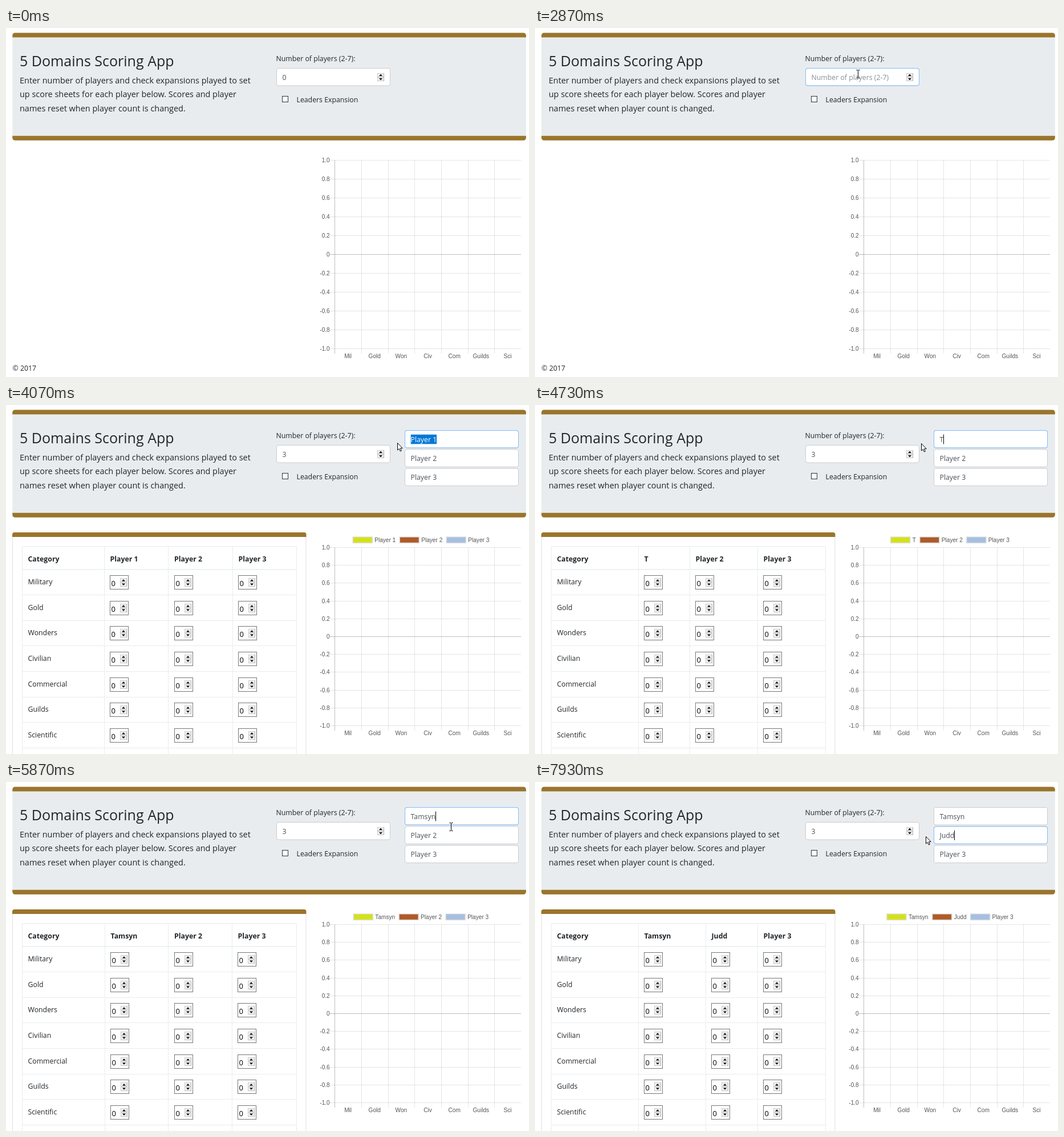
Animation of 917 by 611 pixels, one loop 8000 ms. Source, as an HTML page with a canvas:

```html
<!DOCTYPE html>
<html lang="en">
<head>
<meta charset="utf-8">
<title>Scoring App</title>
<style>
  html, body { margin: 0; width: 100%; height: 100%; overflow: hidden; background: #fff; }
  canvas { display: block; }
</style>
</head>
<body>
<canvas id="stage" width="917" height="611"></canvas>
<script>
const ctx = document.getElementById('stage').getContext('2d');
const LOOP = 8000, TICKS_PER_SECOND = 15;
const SANS = '"Open Sans", "Noto Sans", sans-serif';
const ARIAL = '"Liberation Sans", Arial, sans-serif';
const BODY = `12.3px ${SANS}`, BOLD = `bold 12.3px ${SANS}`, CHART = `10.1px ${ARIAL}`;
const INK = '#212529', GOLD = '#9a752b', GRID = '#e9ecef', FIELD_INK = '#495057', CHART_INK = '#555';

const CATEGORIES = ['Military', 'Gold', 'Wonders', 'Civilian', 'Commercial', 'Guilds', 'Scientific'];
const CHART_LABELS = ['Mil', 'Gold', 'Won', 'Civ', 'Com', 'Guilds', 'Sci'];
const COLORS = ['#d4e219', '#b05a28', '#a5bfe2'];

const NUMBER_FIELD = { x: 474, y: 70 };
const NAME_FIELDS = [0, 1, 2].map(i => ({ x: 699, y: 44 + i * 33.3 }));
const FIELD_W = 200, FIELD_H = 31.5;

// All times below are in ticks.
const CLEAR = 38, READY = 48;
const FOCUS = [[27, 57], [57, 90], [90, Infinity]];
const NAMES = [
  { text: 'Tamsyn', keys: [70, 73, 76, 81, 83, 85] },
  { text: 'Judd', keys: [103, 106, 108, 119] }
];
const CARET_OFF = [[35, 38], [43, 48], [115, 119]];
const MOUSE = [
  [16, 528, 12], [24, 566, 80], [50, 566, 80], [56, 770, 62], [57, 768, 62], [62, 677, 67],
  [82, 677, 67], [88, 780, 78], [89, 782, 86], [93, 685, 87], [95, 685, 87], [96, 685, 95]
];
// Column edges for each length of the first name.
const COLUMNS = [
  [172, 284.5, 397], [181, 271, 390], [181, 271, 390], [179, 274, 391],
  [176, 279, 393], [174, 282, 395], [173, 284.5, 396]
];
const COLUMNS_SECOND = [181, 299, 390];

const clamp = v => Math.max(0, Math.min(1, v));

function text(str, x, y, font = BODY, color = INK, align = 'left') {
  ctx.font = font;
  ctx.fillStyle = color;
  ctx.textAlign = align;
  ctx.fillText(str, x, y);
}

function widthOf(str, font = BODY) {
  ctx.font = font;
  return ctx.measureText(str).width;
}

function rect(x, y, w, h, color) {
  ctx.fillStyle = color;
  ctx.fillRect(x, y, w, h);
}

function line(x1, y1, x2, y2, color, width = 1) {
  ctx.strokeStyle = color;
  ctx.lineWidth = width;
  ctx.beginPath();
  ctx.moveTo(x1, y1);
  ctx.lineTo(x2, y2);
  ctx.stroke();
}

function polygon(points, fill, stroke) {
  ctx.beginPath();
  points.forEach(([x, y]) => ctx.lineTo(x, y));
  ctx.closePath();
  ctx.fillStyle = fill;
  ctx.fill();
  if (stroke) {
    ctx.strokeStyle = stroke;
    ctx.lineWidth = 1;
    ctx.stroke();
  }
}

function spinner(x, y, h) {
  const mid = x + 6, half = h / 2;
  for (const top of [y, y + half]) {
    rect(x, top, 12, half, '#b0b0b0');
    rect(x + 0.5, top + 0.5, 10.5, half - 1.2, '#f0f0f0');
  }
  polygon([[mid - 3, y + half - 2], [mid + 3, y + half - 2], [mid, y + half - 5.2]], '#000');
  polygon([[mid - 3, y + half + 2], [mid + 3, y + half + 2], [mid, y + half + 5.2]], '#000');
}

function mouseAt(tick) {
  if (tick < MOUSE[0][0]) return null;
  const next = MOUSE.findIndex(key => key[0] > tick);
  if (next < 0) return MOUSE.at(-1).slice(1);
  const [t0, x0, y0] = MOUSE[next - 1], [t1, x1, y1] = MOUSE[next];
  const u = (tick - t0) / (t1 - t0), ease = u * u * (3 - 2 * u);
  return [Math.round(x0 + (x1 - x0) * ease), Math.round(y0 + (y1 - y0) * ease)];
}

function field(box, value, focus, tick, selectFrom) {
  const { x, y } = box, textX = x + 10.5, baseline = y + 20.5;
  const [start, end] = focus;
  ctx.beginPath();
  ctx.roundRect(x + 0.5, y + 0.5, FIELD_W - 1, FIELD_H - 1, 3.3);
  ctx.fillStyle = '#fff';
  ctx.fill();
  ctx.lineWidth = 1;
  ctx.strokeStyle = '#c9ccd0';
  ctx.stroke();
  ctx.globalAlpha = clamp((tick - start) / 2) * clamp(1 - (tick - end) / 2);
  ctx.strokeStyle = '#80bdff';
  ctx.stroke();
  ctx.globalAlpha = 1;

  text(value, textX, baseline, BODY, FIELD_INK);
  if (tick < start || tick >= end) return;
  const right = textX + widthOf(value);
  const left = Math.max(textX, selectFrom);
  if (left < right) {
    ctx.save();
    ctx.beginPath();
    ctx.rect(left, y + 7.5, right - left, 17);
    ctx.clip();
    rect(left, y + 7.5, right - left, 17, '#0078d7');
    text(value, textX, baseline, BODY, '#fff');
    ctx.restore();
  } else if (!CARET_OFF.some(([off, on]) => tick >= off && tick < on)) {
    rect(Math.round(right), y + 7.5, 1, 17, '#000');
  }
}

function header() {
  const x = 11.3, y = 8.4, w = 900.5, h = 188.4, bar = 8;
  ctx.save();
  ctx.beginPath();
  ctx.roundRect(x, y, w, h, 4.5);
  ctx.clip();
  rect(x - 1, y - 1, w + 2, h + 2, GRID);
  rect(x - 1, y - 1, w + 2, bar + 1, GOLD);
  rect(x - 1, y + h - bar, w + 2, bar + 1, GOLD);
  ctx.restore();

  text('5 Domains Scoring App', 24, 67, `25px ${SANS}`);
  ['Enter number of players and check expansions played to set',
   'up score sheets for each player below. Scores and player',
   'names reset when player count is changed.'
  ].forEach((row, i) => text(row, 24, 96.5 + i * 24.5, `14.45px ${SANS}`));

  text('Number of players (2-7):', 473.5, 57.5);
  rect(484, 119, 11, 11, '#333');
  rect(485, 120, 9, 9, '#fff');
  text('Leaders Expansion', 509.5, 129.5);
}

function scoreTable(names, columns) {
  const LEFT = 28.5, RIGHT = 509.5, TOP = 247.5, ROW = 44.65;
  line(11.5, 231, 11.5, 611, '#dfdfdf');
  line(526, 231, 526, 611, '#dfdfdf');
  ctx.beginPath();
  ctx.roundRect(11, 223, 515.5, 8, [4, 4, 0, 0]);
  ctx.fillStyle = GOLD;
  ctx.fill();

  line(LEFT, TOP, RIGHT, TOP, GRID);
  line(LEFT, 288, RIGHT, 288, GRID, 1.7);
  for (const x of [LEFT, ...columns, RIGHT]) line(Math.floor(x) + 0.5, TOP, Math.floor(x) + 0.5, 611, GRID);
  text('Category', 38.5, 273.5, BOLD);
  names.forEach((name, i) => text(name, columns[i] + 10.5, 273.5, BOLD));

  CATEGORIES.forEach((category, i) => {
    const y = Math.round(298 + i * ROW);
    text(category, 38.5, y + 16);
    const bottom = Math.floor(332.5 + i * ROW) + 0.5;
    line(LEFT, bottom, RIGHT, bottom, GRID);
    for (const column of columns) {
      const x = Math.round(column + 10);
      rect(x, y, 33, 25, '#777');
      rect(x + 1, y + 1, 31, 23, '#fff');
      text('0', x + 2.5, y + 18.5, `13px ${SANS}`, '#000');
      spinner(x + 18, y + 5, 15);
    }
  });
}

function chart(top) {
  const LEFT = 576.8, RIGHT = 903, BOTTOM = 561.5, STEP = 46.64;
  const faint = 'rgba(0,0,0,.1)', strong = 'rgba(0,0,0,.25)';
  for (let i = 0; i <= 10; i++) {
    const y = Math.floor(top + (BOTTOM - top) * i / 10) + 0.5;
    const value = (5 - i) / 5;
    line(568, y, RIGHT, y, i === 5 ? strong : faint);
    text(value ? value.toFixed(1) : '0', 567.7, y + 3, CHART, CHART_INK, 'right');
  }
  CHART_LABELS.forEach((label, i) => {
    const x = Math.floor(LEFT + i * STEP) + 0.5;
    line(x, top, x, 570, i ? faint : strong);
    text(label, LEFT + (i + 0.5) * STEP - 0.5, 577.5, CHART, CHART_INK, 'center');
  });
}

function legend(names) {
  const GAP = 8.5;
  const widths = names.map(name => 45 + widthOf(name, CHART));
  let x = 727 - (widths.reduce((a, b) => a + b) - GAP) / 2;
  names.forEach((name, i) => {
    rect(x, 231, 34, 10.5, COLORS[i]);
    ctx.strokeStyle = 'rgba(220,220,220,.9)';
    ctx.lineWidth = 1.5;
    ctx.strokeRect(x, 231, 34, 10.5);
    text(name, x + 38, 239.5, CHART, CHART_INK);
    x += widths[i];
  });
}

function pointer([x, y], overField) {
  if (overField) {
    line(x + 0.5, y - 6, x + 0.5, y + 7, '#000');
    for (const end of [y - 6.5, y + 7.5]) {
      line(x - 2.5, end, x, end, '#000');
      line(x + 1, end, x + 3.5, end, '#000');
    }
    return;
  }
  const shape = [[0, 0], [0, 12.5], [2.8, 10], [4.8, 14.5], [6.8, 13.6], [4.9, 9.2], [8.8, 9.2]];
  polygon(shape.map(([dx, dy]) => [x + 0.5 + dx, y + 0.5 + dy]), '#fff', '#000');
}

function draw(tick) {
  const ready = tick >= READY;
  const mouse = mouseAt(tick);
  const typed = NAMES.map(({ keys }) => keys.filter(key => key <= tick).length);
  const names = [0, 1, 2].map(i => typed[i] ? NAMES[i].text.slice(0, typed[i]) : `Player ${i + 1}`);

  rect(0, 0, 917, 611, '#fff');
  header();
  const count = tick < CLEAR ? '0' : ready ? '3' : '';
  field(NUMBER_FIELD, count, FOCUS[0], tick, Infinity);
  if (!count) text('Number of players (2-7)', 484.5, 90.5, BODY, '#868e96');
  spinner(651, 79, 14);

  if (ready) {
    NAME_FIELDS.forEach((box, i) => {
      const selectFrom = i < 2 && !typed[i] && mouse ? mouse[0] : Infinity;
      field(box, names[i], FOCUS[i + 1] || [Infinity, Infinity], tick, selectFrom);
    });
    scoreTable(names, typed[1] ? COLUMNS_SECOND : COLUMNS[typed[0]]);
    legend(names);
    chart(249.5);
  } else {
    chart(231.5);
    text('© 2017', 11.5, 599.5);
  }

  if (mouse) {
    const fields = ready ? [NUMBER_FIELD, ...NAME_FIELDS] : [NUMBER_FIELD];
    const inside = ({ x, y }) => mouse[0] >= x && mouse[0] < x + FIELD_W && mouse[1] >= y && mouse[1] < y + FIELD_H;
    pointer(mouse, fields.some(inside));
  }
}

function play() {
  const time = performance.now() % LOOP;
  draw(Math.floor((time + 5) * TICKS_PER_SECOND / 1000));
  requestAnimationFrame(play);
}
play();
</script>
</body>
</html>
```
